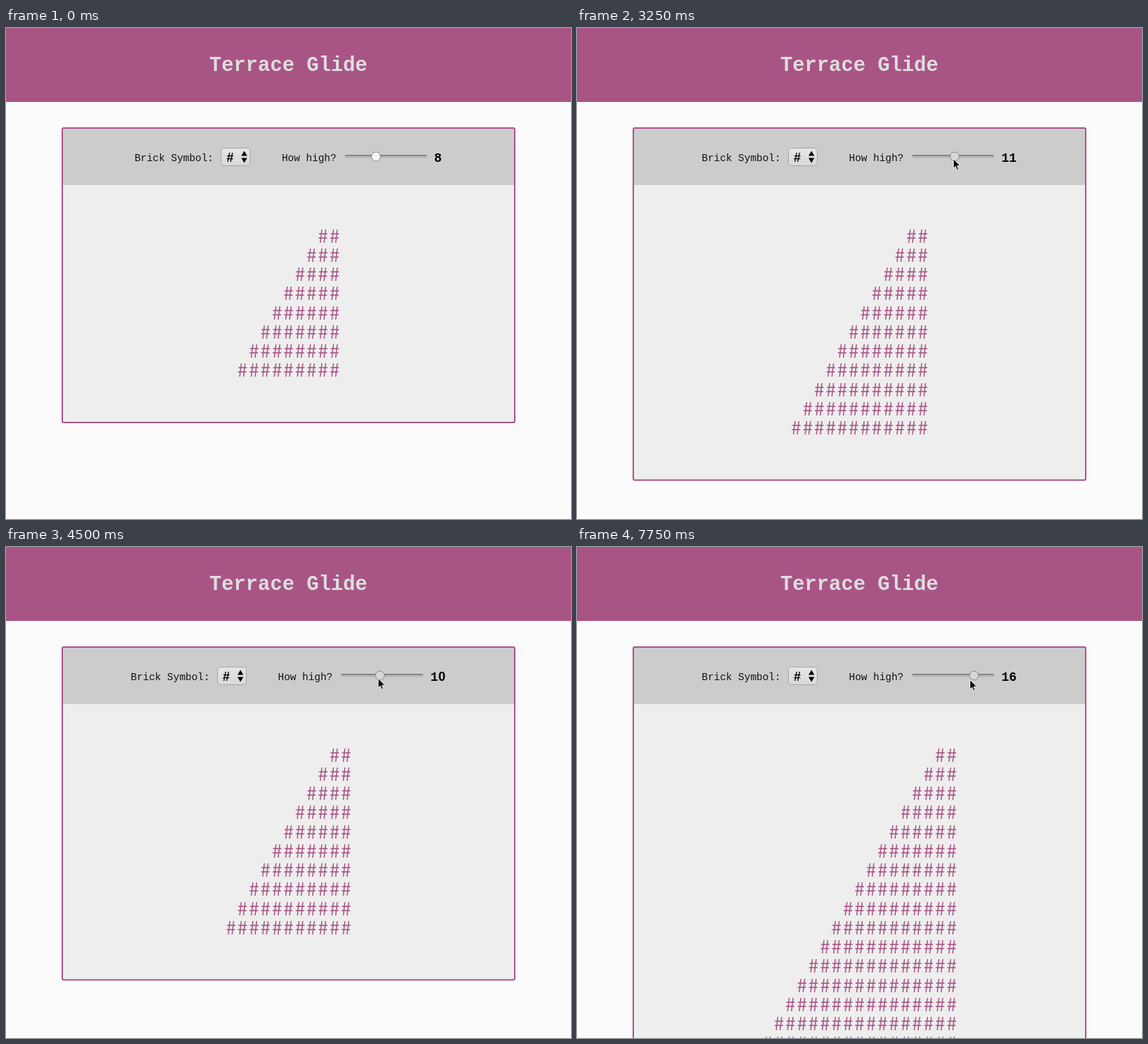
Recreate the animation shown at these times as an HTML page. Size 803x697 px, loop 8000 ms.

```html
<!DOCTYPE html>
<html lang="en">
<head>
<meta charset="utf-8">
<title>Terrace Glide</title>
<style>
  html, body { margin: 0; width: 100%; height: 100%; overflow: hidden; background: #fbfbfb; }
  svg { display: block; }
  text { font-family: "Liberation Mono", "Courier New", monospace; white-space: pre; }
  .title { font-size: 28.8px; font-weight: bold; fill: #dedede; }
  .label { font-size: 14.4px; fill: #111; }
  .value { font-size: 18px; font-weight: bold; }
  .sans { font: bold 18px "Liberation Sans", Arial, sans-serif; }
  #bricks text { font: 26px "Noto Sans CJK JP", "Noto Sans CJK SC", sans-serif; fill: #a85586; text-anchor: middle; }
</style>
</head>
<body>
<svg width="803" height="697" viewBox="0 0 803 697">
  <defs>
    <linearGradient id="button" x2="0" y2="1">
      <stop stop-color="#e6e6e6"/><stop offset="1" stop-color="#d9d9d9"/>
    </linearGradient>
    <linearGradient id="groove" x2="0" y2="1">
      <stop offset=".2" stop-color="#7c7c7c"/><stop offset=".5" stop-color="#b4b4b4"/><stop offset="1" stop-color="#c4c4c4"/>
    </linearGradient>
  </defs>
  <rect width="803" height="105" fill="#a85586"/>
  <text class="title" x="289" y="60.5">Terrace Glide</text>

  <rect id="panel" x="80" y="142" width="643" rx="2" fill="#eee" stroke="#a85586" stroke-width="2"/>
  <rect x="81" y="143" width="641" height="80" fill="#ccc"/>
  <g id="bricks"></g>

  <g id="controls">
    <text class="label" x="177.3" y="189">Brick Symbol:</text>
    <rect x="300.5" y="170.5" width="41" height="25" rx="4" fill="url(#button)" stroke="#a6a6a6"/>
    <text class="sans" x="308" y="189.5">#</text>
    <path d="M329 181.5l4.2-7 4.2 7zM329 184.5h8.4l-4.2 7z"/>
    <text class="label" x="386.5" y="189">How high?</text>
    <rect x="476" y="180" width="117" height="5" rx="2.5" fill="url(#groove)"/>
    <circle id="thumb" cy="182.5" r="6.4" stroke="#888"/>
    <text id="value" class="value" x="603.2" y="189.5"></text>
  </g>

  <path id="cursor" d="M0 0V13.5L3.1 10.7 5.2 15.6 7.4 14.7 5.3 9.8H9.6Z" stroke="#fff" stroke-width=".9"/>
</svg>
<script>
const LOOP = 8000, STEP = 250, GRAB = 2750, PRESS = 3000;
const PITCH = 27.27, CELL = 16.36, MIDDLE = 401.5;
const REST = { x: 525, y: 185.5 };

// turning points of the drag: [time, pointer x]
const drag = [
  [GRAB, REST.x], [PRESS, 527], [3250, 535], [4000, 548], [4250, 544], [4500, 529],
  [4750, 529], [5500, 580], [5750, 602.5], [7000, 602.5], [7250, 585], [7750, 558.5]
];

const el = id => document.getElementById(id);
const move = (id, x, y) => el(id).setAttribute("transform", `translate(${x} ${y})`);

function dragX(t) {
  const i = Math.max(1, drag.findIndex(([time]) => time >= t));
  const [[t0, x0], [t1, x1]] = [drag[i - 1], drag[i]];
  return x0 + (x1 - x0) * (t - t0) / (t1 - t0);
}

function pointerAt(t) {
  if (t < STEP) return { x: -50, y: -50 };
  if (t >= GRAB) return { x: dragX(t), y: REST.y + 3 * (t - GRAB) / 5000 };
  // glide in: the pointer swings past the thumb and settles on it
  const k = t / STEP - 1;
  return {
    x: REST.x + 98 * 0.485 ** k * Math.cos(0.68 * k),
    y: REST.y - 110 * 0.41 ** k
  };
}

function drawBricks(height) {
  const right = MIDDLE + height * CELL / 2;
  el("bricks").innerHTML = Array.from({ length: height }, (_, row) => {
    const centres = Array.from({ length: row + 2 }, (_, i) => right - (row + 1 - i) * CELL);
    return `<text x="${centres.join(" ")}" y="${304.5 + row * PITCH}">${"#".repeat(row + 2)}</text>`;
  }).join("");
}

function show(t) {
  const { x, y } = pointerAt(t);
  const pressed = t >= PRESS;
  const height = pressed ? Math.min(20, Math.floor(10.1 + (x - 529) / 4.6)) : 8;
  el("panel").setAttribute("height", 418 + (height - 8) * PITCH);
  drawBricks(height);
  // a one-digit value is narrower, so the centred controls sit further right
  move("controls", height < 10 ? 5.4 : 0, 0);
  el("thumb").setAttribute("cx", 531.3 + (height - 10) * 5.48);
  el("thumb").setAttribute("fill", pressed ? "#d6d6d6" : "#f6f6f6");
  el("value").innerHTML = String(height).replace("0", '<tspan class="sans" dx=".4">0</tspan>');
  move("cursor", x, y);
}

let shown;
function frame(now) {
  const t = Math.floor(now % LOOP / STEP) * STEP;
  if (t !== shown) show(shown = t);
  requestAnimationFrame(frame);
}
frame(0);
</script>
</body>
</html>
```
